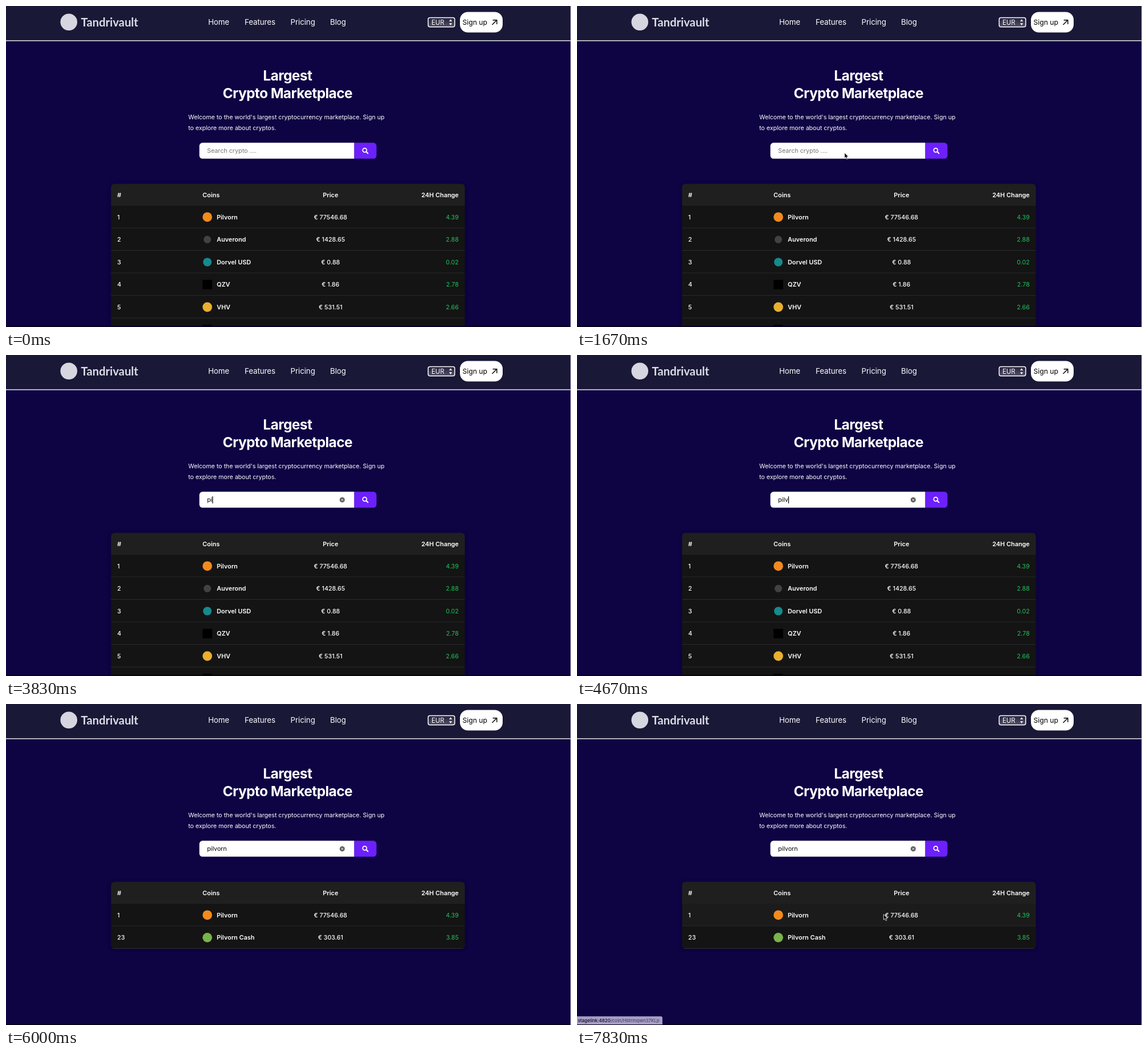
Animation of 992 by 564 pixels, one loop 8000 ms. Source, as an HTML page:

```html
<!DOCTYPE html>
<html lang="en">
<head>
<meta charset="utf-8">
<title>Crypto Marketplace</title>
<style>
  html, body { margin: 0; width: 100%; height: 100%; overflow: hidden; background: #0e0343; }
  svg { display: block; width: 992px; height: 564px; }
  text { font: 400 10.8px Inter, "Open Sans", sans-serif; fill: #fff; white-space: pre; }
  .brand { font: 700 20.3px Lato, sans-serif; fill: #dcdce5; }
  .nav text { font-size: 13.3px; letter-spacing: -.06px; }
  .nav .select { font-size: 11.3px; letter-spacing: 0; }
  .nav .sign { font-size: 12.2px; letter-spacing: 0; fill: #000; }
  .title text { font-size: 24.5px; font-weight: 700; letter-spacing: -.6px; text-anchor: middle; }
  .intro text { font-size: 10.7px; letter-spacing: -.03px; }
  .search text { font-size: 10.75px; fill: #000; }
  .search .hint { fill: #757575; }
  .table text { font-weight: 500; font-size: 10.7px; }
  .table .bold { font-weight: 600; font-size: 10.9px; }
  .mid { text-anchor: middle; }
  .end { text-anchor: end; }
  .table .up { fill: #1fc45c; font-weight: 400; }
  .table { filter: drop-shadow(0 1px 3px rgba(0, 0, 0, .25)); }
  #link text { font-size: 8px; fill: #413a58; }
  #link tspan { font-weight: 500; fill: #100b22; }
</style>
</head>
<body>
<svg viewBox="0 0 992 564">
  <defs>
    <linearGradient id="glass" x2="0" y2="1">
      <stop stop-color="#23213a"/>
      <stop offset="1" stop-color="#55536a"/>
    </linearGradient>
    <clipPath id="round"><rect id="clip" x="184.5" y="312.5" width="621" rx="6"/></clipPath>
  </defs>

  <rect width="992" height="564" fill="#0e0343"/>
  <rect width="992" height="61" fill="#1a1837"/>
  <rect y="60.3" width="992" height="1.4" fill="#f4f3f8"/>

  <circle cx="110.3" cy="28.3" r="14.8" fill="#d6d6e0"/>
  <text class="brand" x="131.5" y="36">Tandrivault</text>

  <g class="nav">
    <text x="355" y="33.3">Home</text>
    <text x="419" y="33.3">Features</text>
    <text x="499.5" y="33.3">Pricing</text>
    <text x="569" y="33.3">Blog</text>
    <rect x="741.2" y="20.4" width="46.6" height="16.4" rx="3" fill="url(#glass)" stroke="#fff" stroke-width="1.5"/>
    <text class="select" x="747" y="32.5">EUR</text>
    <path d="M778 27l2.6-3.7 2.6 3.7zM778 30.2l2.6 3.7 2.6-3.7z" fill="#fff"/>
    <rect x="797" y="10.5" width="75" height="36" rx="14" fill="#fff"/>
    <text class="sign" x="801.5" y="33">Sign up</text>
    <path d="M853.5 33l8-8M854.6 24.8h7.2V32" fill="none" stroke="#000" stroke-width="1.4"/>
  </g>

  <g class="title">
    <text x="494.3" y="131">Largest</text>
    <text x="494.3" y="162">Crypto Marketplace</text>
  </g>

  <g class="intro">
    <text x="320" y="199">Welcome to the world's largest cryptocurrency marketplace. Sign up</text>
    <text x="320" y="218.2">to explore more about cryptos.</text>
  </g>

  <g class="search">
    <path d="M611.5 240.3H345a5.5 5.5 0 0 0-5.5 5.5v17a5.5 5.5 0 0 0 5.5 5.5h266.5z" fill="#fff"/>
    <path d="M611.5 240.3H645a5.5 5.5 0 0 1 5.5 5.5v17a5.5 5.5 0 0 1-5.5 5.5h-33.5z" fill="#6c20fb"/>
    <circle cx="629.8" cy="253.3" r="3.5" fill="none" stroke="#fff" stroke-width="1.7"/>
    <path d="M632.4 256l3 3" stroke="#fff" stroke-width="2" stroke-linecap="round"/>
    <text id="query" x="353" y="258.3"></text>
    <rect id="caret" y="248.3" width="1.2" height="12.4" fill="#000"/>
    <g id="clear">
      <circle cx="590.3" cy="254.5" r="4.5" fill="#606060"/>
      <path d="M588.7 252.9l3.2 3.2m0-3.2l-3.2 3.2" stroke="#fff" stroke-width="1"/>
    </g>
  </g>

  <g class="table">
    <g clip-path="url(#round)">
      <rect x="184" y="312" width="622" height="39" fill="#1f1f1f"/>
      <text class="bold" x="195.3" y="335.9">#</text>
      <text class="bold" x="345" y="335.9">Coins</text>
      <text class="bold mid" x="569.8" y="335.9">Price</text>
      <text class="bold end" x="794.8" y="335.9">24H Change</text>
      <g id="all"></g>
      <g id="found"></g>
    </g>
  </g>

  <rect y="562" width="992" height="2" fill="#07021f"/>
  <rect x="991" width="1" height="564" fill="#c4c1d3"/>

  <g id="link">
    <path d="M0 548.7h147a3 3 0 0 1 3 3v11.3H0z" fill="#a79dc4"/>
    <text x="1.5" y="558.6"><tspan>stagelink:4820</tspan>/coin/Hbtrmqwn37KLp</text>
  </g>

  <g id="pointer" stroke-linejoin="round">
    <path id="arrow" d="M0 0V9.6L2.2 7.6 3.8 11.1 5.5 10.3 3.9 6.9H6.9Z" fill="#000" stroke="#fff" stroke-width=".8"/>
    <path id="hand" d="M-.9 5.5V.9Q0-.7 .9 .9V3.8L5 4.8Q6 5.2 5.9 6.3L5.2 10H.2L-2.7 6.4Q-2.7 5-.9 6Z" fill="#fff" stroke="#000" stroke-width=".8"/>
  </g>
</svg>

<script>
const $ = id => document.getElementById(id);
const LOOP = 8000, ROW = 39.55, TOP = 351;
const word = 'pilvorn';
const keyTimes = [3170, 3830, 4170, 4670, 5000, 5170, 5500];

const first = [1, 'Pilvorn', '€ 77546.68', '4.39', '#f28a1e'];
const coins = [
  first,
  [2, 'Auverond', '€ 1428.65', '2.88', '#424242', 6.5],
  [3, 'Dorvel USD', '€ 0.88', '0.02', '#168a8c', 7.5],
  [4, 'QZV', '€ 1.86', '2.78', '#000', 0],
  [5, 'VHV', '€ 531.51', '2.66', '#e9af2f'],
  [6, '', '', '', '#000', 0]
];
const matches = [first, [23, 'Pilvorn Cash', '€ 303.61', '3.85', '#79b34a']];

// A radius of 0 gives a square icon.
function row([rank, name, price, change, color, r = 8.4], i) {
  const y = TOP + i * ROW, mid = y + 19.8, base = mid + 4;
  const icon = r
    ? `<circle cx="353.5" cy="${mid}" r="${r}" fill="${color}"/>`
    : `<rect x="345.2" y="${mid - 8.3}" width="16.6" height="16.6" fill="${color}"/>`;
  return `<rect class="bg" x="184" y="${y}" width="622" height="${ROW}" fill="#141414"/>
    <rect x="184" y="${y + ROW - 1}" width="622" height="1" fill="#303030"/>${icon}
    <text x="195.3" y="${base}">${rank}</text>
    <text class="bold" x="370" y="${base}">${name}</text>
    <text class="mid" x="569.8" y="${base}">${price}</text>
    <text class="end up" x="794.8" y="${base}">${change}</text>`;
}
$('all').innerHTML = coins.map(row).join('');
$('found').innerHTML = matches.map(row).join('');
const hovered = $('found').querySelector('.bg');

// Pointer path: time, x, y
const enter = [[330, 560, 332], [1330, 476, 263], [1670, 469.8, 258], [2000, 468, 256]];
const leave = [[6330, 470, 260], [7170, 542.3, 381], [7500, 541, 376], [7830, 538.3, 369.5]];

function along(path, t) {
  let i = 0;
  while (i < path.length - 2 && t > path[i + 1][0]) i++;
  const [t0, x0, y0] = path[i], [t1, x1, y1] = path[i + 1];
  const k = Math.min(1, Math.max(0, (t - t0) / (t1 - t0)));
  return [x0 + (x1 - x0) * k, y0 + (y1 - y0) * k];
}

const show = (el, on) => el.setAttribute('visibility', on ? 'inherit' : 'hidden');

function draw(time) {
  // The screen refreshes six times a second.
  const t = Math.floor((time + 5) * 6 / 1000) * 1000 / 6 + 5;

  const typed = word.slice(0, keyTimes.filter(k => t >= k).length);
  const query = $('query');
  query.textContent = typed || 'Search crypto ....';
  query.classList.toggle('hint', !typed);
  $('caret').setAttribute('x', 353 + (typed ? query.getComputedTextLength() : 0));
  show($('caret'), t >= 2000 && t < 6000 && !(t >= 2330 && t < 2670));
  show($('clear'), typed);

  const filtered = t >= 6000;
  show($('all'), !filtered);
  show($('found'), filtered);
  $('clip').setAttribute('height', filtered ? 118 : 260);

  const [x, y] = along(filtered ? leave : enter, t);
  const hand = filtered && y > TOP && t < 7670;
  $('pointer').setAttribute('transform', `translate(${x} ${y})`);
  show($('pointer'), (t >= 330 && t < 3170) || t >= 6330);
  show($('arrow'), !hand);
  show($('hand'), hand);

  hovered.setAttribute('fill', t >= 7330 ? '#1b1b1b' : '#141414');
  $('link').setAttribute('opacity', t < 7000 ? 0 : t < 7170 ? .35 : t < 7330 ? .72 : 1);
}

const start = performance.now();
function tick() {
  draw((performance.now() - start) % LOOP);
  requestAnimationFrame(tick);
}
tick();
</script>
</body>
</html>
```
